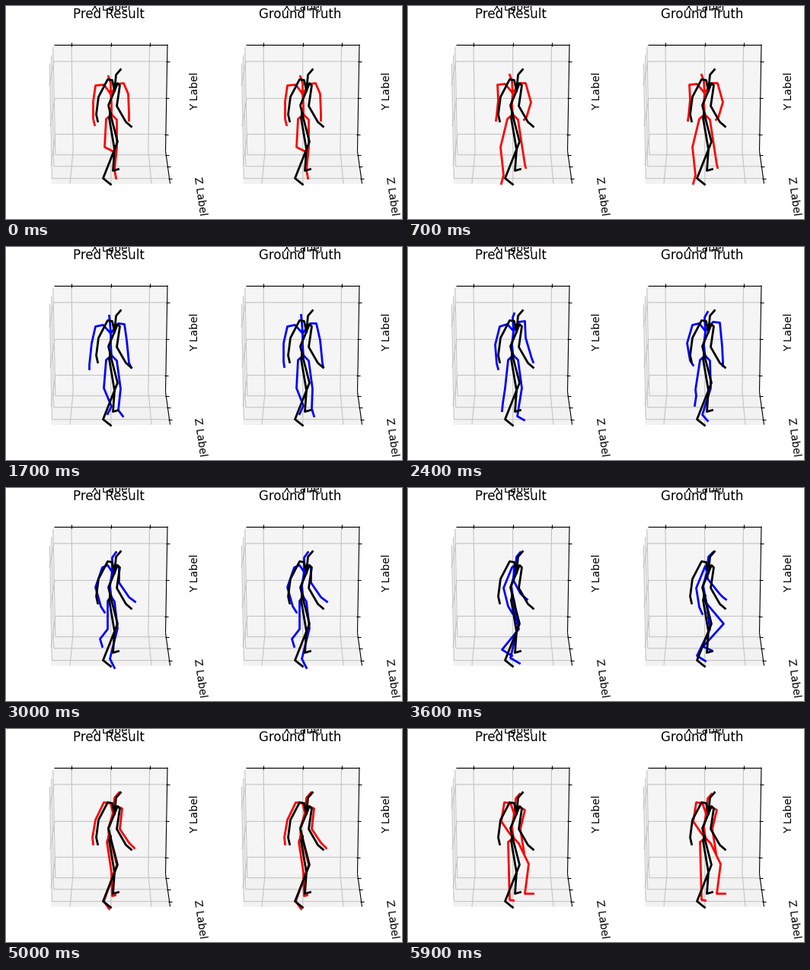
A matplotlib script that plays this animation: 520x280 px, repeating every 6000 ms.

```python
import numpy as np
import matplotlib.pyplot as plt
from matplotlib.animation import FuncAnimation

W, H, DPI = 520, 280, 100
FRAMES, STEP = 60, 100
PANEL_DX = 252
BLUE_SPAN = range(10, 50)

plt.rcParams["font.family"] = "DejaVu Sans"
fig = plt.figure(figsize=(W / DPI, H / DPI), dpi=DPI, facecolor="white")
ax = fig.add_axes([0, 0, 1, 1])
ax.set_xlim(-0.5, W - 0.5)
ax.set_ylim(H - 0.5, -0.5)
ax.axis("off")


# ---- poses: joints in pixels of the left panel ----

def pose(torso, arm_a, arm_b, leg_a, leg_b):
    """Torso is head, neck, chest, waist; arms start at the collar, legs at the hip."""
    return np.array(torso + arm_a + arm_b + leg_a + leg_b, float)


def variant(base, arm_a, arm_b, leg_a, leg_b, head):
    torso = [head] + base[1:4].tolist()
    return pose(torso, arm_a, arm_b, leg_a, leg_b)


start = pose(
    [(134, 92), (137, 101), (137, 115), (138, 128)],
    [(128, 103), (117, 104), (114, 125), (114, 148), (116, 156)],
    [(146, 102), (154, 101), (160, 115), (161, 140), (161, 150)],
    [(131, 148), (129, 185), (141, 191), (141, 195)],
    [(145, 149), (145, 186), (142, 215), (144, 226)])

stride = pose(
    [(133, 90), (136, 98), (137, 114), (136, 128)],
    [(127, 102), (117, 103), (118, 123), (116, 143), (115, 150)],
    [(146, 101), (154, 101), (161, 126), (155, 146), (152, 149)],
    [(130, 148), (121, 185), (125, 222), (122, 233)],
    [(144, 149), (149, 182), (153, 208), (154, 212)])

passing = pose(
    [(133, 89), (135, 98), (137, 113), (137, 128)],
    [(127, 102), (116, 103), (112, 126), (109, 152), (109, 160)],
    [(146, 101), (154, 101), (160, 124), (158, 150), (159, 156)],
    [(131, 148), (124, 186), (130, 223), (127, 236)],
    [(144, 149), (151, 183), (150, 200), (152, 210)])

reach = pose(
    [(135, 90), (136, 99), (137, 113), (137, 128)],
    [(127, 102), (117, 104), (112, 126), (109, 154), (109, 160)],
    [(147, 100), (155, 101), (158, 122), (161, 152), (164, 158)],
    [(131, 148), (128, 185), (138, 209), (133, 219)],
    [(145, 149), (150, 186), (147, 214), (153, 222)])

reach_true = variant(
    reach,
    [(127, 102), (117, 104), (112, 126), (112, 150), (113, 157)],
    [(147, 100), (155, 100), (160, 122), (163, 152), (164, 157)],
    [(131, 148), (129, 185), (138, 208), (133, 219)],
    [(145, 149), (150, 186), (149, 212), (152, 222)],
    (135, 89))

turn = pose(
    [(139, 87), (137, 92), (138, 110), (136, 128)],
    [(130, 101), (120, 104), (114, 128), (116, 153), (118, 160)],
    [(145, 98), (153, 97), (154, 119), (162, 146), (164, 151)],
    [(131, 148), (127, 185), (124, 205), (123, 215)],
    [(144, 148), (149, 185), (143, 222), (152, 227)])

turn_true = variant(
    turn,
    [(130, 100), (121, 102), (114, 126), (118, 149), (122, 155)],
    [(148, 98), (157, 99), (160, 130), (161, 150), (161, 156)],
    [(131, 148), (125, 187), (126, 195), (124, 208)],
    [(144, 149), (145, 185), (134, 220), (141, 228)],
    (141, 85))

swing = pose(
    [(144, 84), (139, 91), (139, 110), (136, 128)],
    [(133, 101), (126, 104), (117, 130), (124, 155), (129, 163)],
    [(143, 100), (148, 104), (148, 124), (161, 143), (169, 149)],
    [(133, 148), (133, 185), (123, 198), (126, 208)],
    [(142, 149), (146, 184), (136, 224), (142, 236)])

side = pose(
    [(147, 84), (142, 90), (140, 110), (135, 128)],
    [(138, 102), (136, 104), (125, 131), (131, 155), (137, 165)],
    [(139, 104), (138, 121), (147, 138), (151, 142), (156, 146)],
    [(135, 147), (145, 185), (123, 212), (136, 220)],
    [(139, 148), (144, 180), (134, 223), (146, 230)])

side_true = variant(
    side,
    [(138, 102), (137, 104), (126, 131), (130, 156), (134, 165)],
    [(140, 105), (141, 119), (157, 139), (161, 143), (165, 146)],
    [(136, 147), (162, 178), (135, 208), (146, 213)],
    [(139, 148), (144, 185), (127, 220), (138, 227)],
    (148, 84))

arrive = pose(
    [(148, 83), (142, 90), (140, 110), (134, 130)],
    [(137, 97), (128, 96), (117, 119), (113, 142), (114, 151)],
    [(145, 101), (152, 104), (149, 131), (161, 149), (168, 156)],
    [(132, 148), (138, 188), (139, 219), (143, 218)],
    [(137, 146), (145, 178), (128, 226), (135, 236)])

goal = pose(
    [(150, 83), (144, 90), (142, 111), (134, 130)],
    [(139, 97), (133, 96), (121, 119), (118, 142), (120, 151)],
    [(146, 101), (149, 104), (145, 131), (157, 152), (164, 158)],
    [(135, 147), (142, 188), (140, 216), (147, 214)],
    [(138, 147), (146, 178), (127, 226), (137, 234)])

leave = pose(
    [(146, 85), (141, 91), (139, 111), (136, 128)],
    [(134, 97), (126, 96), (122, 121), (133, 137), (138, 143)],
    [(146, 102), (153, 106), (147, 131), (151, 156), (152, 163)],
    [(131, 148), (132, 187), (133, 224), (138, 225)],
    [(145, 150), (158, 177), (153, 216), (164, 216)])

TIMES = np.array([0, 7, 12, 17, 24, 30, 36, 50, 52, 59], float)
pred_keys = np.array([start, stride, passing, reach, turn,
                      swing, side, arrive, goal, leave])
true_keys = np.array([start, stride, passing, reach_true, turn_true,
                      swing, side_true, arrive, goal, leave])


def tangents(keys):
    """Slopes that keep every coordinate from overshooting its keys."""
    d = np.diff(keys, axis=0) / np.diff(TIMES)[:, None, None]
    m = np.zeros_like(keys)
    m[0], m[-1] = d[0], d[-1]
    prod, total = d[:-1] * d[1:], d[:-1] + d[1:]
    same = prod > 0
    m[1:-1][same] = 2 * prod[same] / total[same]
    return m


def pose_at(keys, slopes, t):
    i = min(np.searchsorted(TIMES, t, side="right") - 1, len(TIMES) - 2)
    h = TIMES[i + 1] - TIMES[i]
    u = (t - TIMES[i]) / h
    return ((1 + 2 * u) * (1 - u) ** 2 * keys[i]
            + u * (1 - u) ** 2 * h * slopes[i]
            + u * u * (3 - 2 * u) * keys[i + 1]
            + u * u * (u - 1) * h * slopes[i + 1])


def skeleton(p, dx):
    """Join the joints into one path with gaps between the limbs."""
    torso, arm_a, arm_b, leg_a, leg_b = np.split(p, [4, 9, 14, 18])
    chest = torso[2]
    pelvis = (leg_a[0] + leg_b[0]) / 2 - (0, 6.5)
    gap = (np.nan, np.nan)
    path = np.vstack([torso, pelvis, gap,
                      chest, arm_a, gap, chest, arm_b, gap,
                      pelvis, leg_a, gap, pelvis, leg_b])
    return path[:, 0] + dx, path[:, 1]


# ---- box with grid, axes and labels ----

FAR_TL, FAR_TR = np.array([62, 50]), np.array([211.5, 50])
FAR_BL, FAR_BR = np.array([65, 190]), np.array([209, 190])
NEAR_TL = np.array([56, 80])
NEAR_BL, NEAR_BR = np.array([59, 233]), np.array([215, 233])
X_TICKS = (0.157, 0.502, 0.843)
Y_TICKS = (0.16, 0.507, 0.843)
Z_TICKS = (0.12, 0.47, 0.84)


def mix(a, b, f):
    return a + (b - a) * f


def draw_box(dx, title):
    def line(points, color):
        xy = np.array(points) + (dx, 0)
        ax.plot(*xy.T, color=color, lw=0.8, zorder=2 if color == "black" else 1,
                solid_capstyle="butt")

    def pane(corners, color):
        xy = np.array(corners) + (dx, 0)
        ax.fill(*xy.T, facecolor=color, edgecolor=color, lw=0.5, zorder=0)

    def label(x, y, text, size=10, angle=0):
        ax.text(x + dx, y, text, size=size, rotation=angle, ha="center",
                va="baseline", rotation_mode="anchor", zorder=5)

    pane([FAR_TL, FAR_BL, NEAR_BL, NEAR_TL], "#f9f9f9")
    pane([FAR_BL, FAR_BR, NEAR_BR, NEAR_BL], "#f2f2f2")
    pane([FAR_TL, FAR_TR, FAR_BR, FAR_BL], "#f5f5f5")

    grid = "#c4c4c4"
    for f in X_TICKS:
        top = mix(FAR_TL, FAR_TR, f)
        line([top, mix(FAR_BL, FAR_BR, f), mix(NEAR_BL, NEAR_BR, f)], grid)
        line([top - (0, 2.5), top + (0, 2.5)], "black")
    for f in Y_TICKS:
        right = mix(FAR_TR, FAR_BR, f)
        line([right, mix(FAR_TL, FAR_BL, f), mix(NEAR_TL, NEAR_BL, f)], grid)
        line([right - (1.5, 0), right + (3.5, 0)], "black")
    for f in Z_TICKS:
        right = mix(FAR_BR, NEAR_BR, f)
        line([right, mix(FAR_BL, NEAR_BL, f), mix(FAR_TL, NEAR_TL, f)], grid)
        line([right - (1.5, 0), right + (3.5, 0)], "black")
    line([FAR_TL, FAR_TR], "black")
    line([FAR_TR, FAR_BR], "black")
    line([FAR_BR, NEAR_BR], "black")

    label(134, 16, title, size=12)
    label(137, 6, "X Label")
    label(252, 111, "Y Label", angle=90)
    label(250, 250, "Z Label", angle=-82)


class Panel:
    def __init__(self, dx, title, keys):
        self.dx, self.keys, self.slopes = dx, keys, tangents(keys)
        draw_box(dx, title)
        self.body, = ax.plot([], [], lw=2, zorder=3)
        ax.plot(*skeleton(goal, dx), color="black", lw=2, zorder=4)

    def update(self, i):
        self.body.set_data(*skeleton(pose_at(self.keys, self.slopes, i), self.dx))
        self.body.set_color("blue" if i in BLUE_SPAN else "red")
        return self.body


panels = [Panel(0, "Pred Result", pred_keys),
          Panel(PANEL_DX, "Ground Truth", true_keys)]


def draw(i):
    return [p.update(i) for p in panels]


anim = FuncAnimation(fig, draw, frames=FRAMES, interval=STEP, repeat=True)
plt.show()
```
